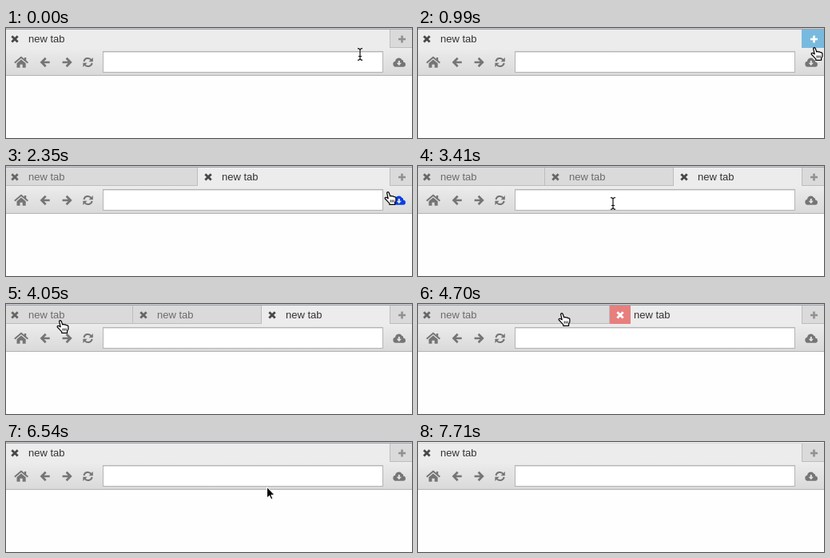
An HTML page that plays this animation: 508 px wide and 138 px high, repeating every 7740 ms.

```html
<!DOCTYPE html>
<html lang="en">
<head>
<meta charset="utf-8">
<title>Browser tabs</title>
<style>
  html, body { margin: 0; width: 100%; height: 100%; overflow: hidden; background: #fefefe; }
  svg { display: block; width: 508px; height: 138px; }
  text { font: 13px "Liberation Sans", Arial, sans-serif; fill: #6c6c6c; }
  .bg { fill: #dadada; }
  .edge { fill: #bdbdbd; }
  .hot { fill: none; }
  .x { stroke: #666; stroke-width: 2.8; }
  .active .bg, .active .base { fill: #ececec; }
  .active text { fill: #333; }
  .active .x { stroke: #484848; }
  .close .hot { fill: #e77f7d; }
  .close .x { stroke: #fff; }
  #plus path { stroke: #919191; stroke-width: 2.6; }
  #plus.over rect { fill: #78badf; }
  #plus.over path { stroke: #fff; }
  .icon { color: #757575; }
  .icon.over { color: #0a3fe6; }
  .line { fill: none; stroke: currentColor; }
  .solid { fill: currentColor; }
</style>
</head>
<body>
<svg viewBox="0 0 508 138">
  <defs>
    <linearGradient id="bar" x2="0" y2="1">
      <stop stop-color="#ececec"/><stop offset="1" stop-color="#d9d9d9"/>
    </linearGradient>
    <path id="arrow" class="line" stroke-width="2.7" d="M54.7 43H45M49.7 37.8L44.5 43L49.7 48.2"/>
    <g id="turn">
      <path class="line" stroke-width="2" d="M97.5 42A5.1 5.1 0 0 1 106.6 40"/>
      <path class="solid" d="M108.8 37v5.2h-5.2z"/>
    </g>
  </defs>
  <rect width="508" height="138" fill="#fefefe"/>
  <g id="tabs"></g>
  <g id="plus">
    <rect class="edge" x="480" y="2" width="28" height="23"/>
    <rect class="bg" x="481" y="2" width="27" height="22"/>
    <path d="M495.5 9.5v9M491 14h9"/>
  </g>
  <rect y="25" width="508" height="35" fill="url(#bar)"/>
  <rect y="59" width="508" height="1" fill="#b3b3b3"/>
  <rect x="121.5" y="29.5" width="350" height="26" fill="#fff" stroke="#b4b4b4"/>
  <path d="M122 30.5h349" stroke="#e2e2e2"/>
  <g class="icon">
    <path class="line" stroke-width="1.9" d="M10.8 43.8L19 36.8L27.4 43.8"/>
    <path class="solid" d="M13.5 44.2L19 39.6L24.7 44.2V49.8H20.7V45.8H17.5V49.8H13.5zM22.9 37h2.3v4.5l-2.3-2z"/>
  </g>
  <g class="icon" id="back"><use href="#arrow"/></g>
  <g class="icon" id="next"><use href="#arrow" transform="translate(125.3) scale(-1 1)"/></g>
  <g class="icon"><use href="#turn"/><use href="#turn" transform="rotate(180 102.6 43)"/></g>
  <g class="icon" id="load">
    <path class="solid" d="M488 48.8a3.6 3.6 0 0 1-.9-7.1a4.4 4.4 0 0 1 8.2-2a2.7 2.7 0 0 1 1.9 3.1a3 3 0 0 1-.5 6z"/>
    <path fill="#e4e4e4" d="M490.8 41h2v2.8h2.1l-3.1 3.4l-3.1-3.4h2.1z"/>
  </g>
  <rect id="top0" width="508" height="1"/>
  <rect id="top1" y="1" width="508" height="1"/>
  <g id="cursor">
    <g id="hand" stroke="#000" stroke-linejoin="round">
      <path fill="#fff" stroke-width="1.2" d="M-1.4 1.7Q-.1-.2 1.2 1.5L2.7 6Q4 4.9 5.1 6.1Q6.6 5.2 7.5 6.7Q9.4 6.2 9.9 8V11.5L8.6 14V16.3H1.8V14.8L-1 11.8L-3.7 9Q-4.3 7.3-2.3 7.3L.2 8.8z"/>
      <path d="M3.2 10.5v3M5.2 10.5v3M7.2 10.5v3" stroke-width=".9"/>
    </g>
    <path id="beam" fill="none" stroke="#111" stroke-width="1.2" d="M-3-7.3Q0-7.3 0-5.3Q0-7.3 3-7.3M0-6V6M-3 7.3Q0 7.3 0 5.3Q0 7.3 3 7.3M-2 2.5H2"/>
    <path id="pointer" stroke="#fff" d="M.5.5V14.2L3.6 11.3L5.8 16L7.8 15.1L5.8 10.5H10z"/>
  </g>
</svg>
<script>
const LOOP = 7740;
const $ = id => document.getElementById(id);
const show = (el, on) => { el.style.display = on ? "" : "none"; };

// Each move is a Bezier curve from the previous resting point.
const home = [443, 33], addTab = [496, 24], download = [474, 52];
const nextIcon = [61, 49], secondTab = [180, 11], closeTab = [259, 18];
const moves = [
  { start: 60, end: 110, path: [home, [431, 35]] },
  { start: 530, end: 990, path: [[431, 35], [462, 16], addTab] },
  { start: 1830, end: 2000, path: [addTab, download] },
  { start: 2170, end: 2570, path: [download, [471, 26], addTab] },
  { start: 3170, end: 3640, path: [addTab, [452, 21], [100, 72], nextIcon] },
  { start: 3880, end: 4340, path: [nextIcon, [48, 20], [100, -18], secondTab] },
  { start: 4990, end: 5670, path: [secondTab, [205, 78], [345, 55], closeTab] },
  { start: 6260, end: 6940, path: [closeTab, [340, 60], [454, 142]] }
];

const tabs = [0, 1, 2].map(() => {
  const g = document.createElementNS("http://www.w3.org/2000/svg", "g");
  g.innerHTML = `<rect class="bg" y="2" width="483" height="23"/>
    <rect class="edge base" y="24" width="483" height="1"/>
    <rect class="edge" y="2" width="1" height="23"/>
    <rect class="hot" x="1" y="2" width="26" height="23"/>
    <path class="x" d="M10.3 10.2L17.7 17.5M17.7 10.2L10.3 17.5"/>
    <text x="31" y="18">new tab</text>`;
  $("tabs").append(g);
  return g;
});

function bezier(pts, u) {
  if (pts.length === 1) return pts[0];
  const [a, b] = [bezier(pts.slice(0, -1), u), bezier(pts.slice(1), u)];
  return a.map((v, i) => v + (b[i] - v) * u);
}

// The mouse is sampled about every 57 ms.
function mouse(t) {
  const move = moves.filter(m => m.start <= t).pop();
  if (!move) return home;
  const { start, end, path } = move;
  const gaps = Math.round((end - start) / 57);
  const k = Math.floor((t - start) / (end - start) * gaps + 1e-6);
  return bezier(path, Math.min(1, (k + 1) / (gaps + 1))).map(Math.round);
}

function tabCount(t) {
  const opened = [1350, 2870].filter(c => c <= t).length;
  const closed = [4700, 6090].filter(c => c <= t).length;
  return 1 + opened - closed;
}

function draw(t) {
  const [x, y] = mouse(t);
  const inside = (l, r, top, bottom) => x >= l && x < r && y >= top && y < bottom;
  const count = tabCount(t);
  // After a click the hover state lasts until the mouse moves.
  const held = t >= 4700 && t < 4990;

  tabs.forEach((tab, i) => {
    const left = Math.floor(i * 483 / count - 2.5);
    tab.setAttribute("transform", `translate(${left})`);
    tab.classList.toggle("active", i === count - 1);
    tab.classList.toggle("close", inside(left + 1, left + 27, 2, 25) || (held && i === 1));
    show(tab, i < count);
  });

  const over = {
    plus: inside(481, 508, 0, 25),
    load: inside(473, 508, 28, 58),
    back: inside(36, 60, 28, 58),
    next: inside(60, 88, 28, 58)
  };
  for (const id in over) $(id).classList.toggle("over", over[id]);

  const kind = y < 25 || Object.values(over).some(Boolean) ? "hand"
    : inside(121, 473, 29, 56) ? "beam" : "pointer";
  for (const id of ["hand", "beam", "pointer"]) show($(id), id === kind);
  $("cursor").setAttribute("transform", `translate(${x} ${y})`);
  show($("cursor"), t < 6940);

  const pale = t >= 7710;
  $("top0").setAttribute("fill", pale ? "#f0f0f0" : "#c9ccd2");
  $("top1").setAttribute("fill", pale ? "#d6d6d6" : "#a0a3a9");
}

const begin = performance.now();
function tick() {
  draw((performance.now() - begin) % LOOP);
  requestAnimationFrame(tick);
}
tick();
</script>
</body>
</html>
```
